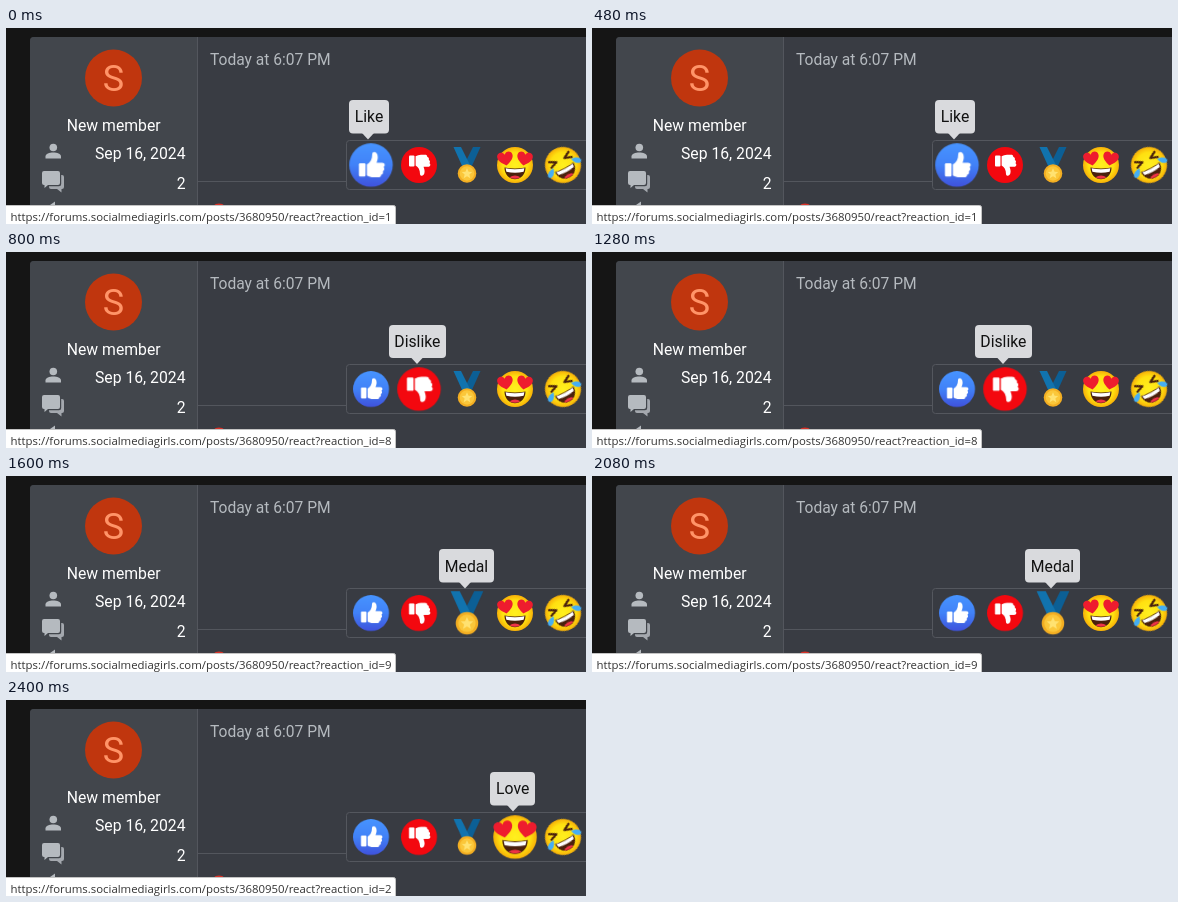
Recreate the animation shown at these times as an HTML page. Size 580 by 196 pixels, loop 3.2 s.

```html
<!DOCTYPE html>
<html lang="en">
<head>
<meta charset="utf-8">
<title>Post reactions</title>
<style>
  html, body { margin: 0; width: 100%; height: 100%; overflow: hidden; background: #151515; }
  svg { display: block; width: 580px; height: 196px; font: 15.75px Roboto, sans-serif; }
  .tip, .url { opacity: 0; animation: show 3.2s step-end infinite; }
  .grow { animation: grow 3.2s step-end infinite; }
  .tip, .url, .grow { animation-delay: calc((var(--i) - 4) * .8s); }
  .tip { text-anchor: middle; }
  .tip rect, .tip path { fill: #d9dadd; }
  .tip text { fill: #111; }
  .status { font: 11.4px "Open Sans", sans-serif; fill: #333; }
  @keyframes show { 0% { opacity: 1 } 25%, 100% { opacity: 0 } }
  @keyframes grow { 0% { transform: scale(1.21) } 25%, 100% { transform: scale(1) } }
</style>
</head>
<body>
<svg viewBox="0 0 580 196">
  <defs>
    <linearGradient id="blue" x2="0" y2="1">
      <stop stop-color="#4794ff"/><stop offset=".5" stop-color="#4182f8"/><stop offset="1" stop-color="#3f52dc"/>
    </linearGradient>
    <radialGradient id="yellow">
      <stop stop-color="#fff01f"/><stop offset=".7" stop-color="#ffe010"/><stop offset="1" stop-color="#f7b008"/>
    </radialGradient>
    <g id="thumb" fill="#fff">
      <rect x="-10" y="-1.5" width="5.5" height="11" rx="1"/>
      <path d="M-3.4-.5C-.5-2 1-5 1-9C1-11.8 5.6-11.5 5.6-6.5C5.6-4.4 4.8-3 4.6-1.8H9.2C11.7-1.8 11.9 1 10.4 1.7C11.5 3 11 4.8 9.8 5.1C10.4 6.6 9.5 7.9 8.3 8.1C8.4 9.6 7.4 10.2 5.8 10.2H2C0 10.2-1.7 9.4-3.4 8.7Z"/>
    </g>
    <path id="heart" fill="#ee1c2e" d="M0 7C-4.3 4.3-7.8 1.2-7.8-2.3C-7.8-7-1.7-8 0-3.8C1.7-8 7.8-7 7.8-2.3C7.8 1.2 4.3 4.3 0 7Z"/>
    <g id="grin">
      <path fill="#4a210c" d="M-10.5 2.5Q0 4.5 10.5 2.5C10.5 18-10.5 18-10.5 2.5Z"/>
      <path fill="#fff" d="M-9.4 3.3Q0 5.2 9.4 3.3L8.6 6.8Q0 8.6-8.6 6.8Z"/>
      <path fill="#ee3346" d="M-5.5 12.2Q0 9 5.5 12.2Q0 15.2-5.5 12.2Z"/>
    </g>
  </defs>

  <!-- post panel -->
  <path fill="#393c43" d="M24 196V13Q24 9 28 9H580V196Z"/>
  <path fill="#42464c" d="M24 196V13Q24 9 28 9H191V196Z"/>
  <path fill="none" stroke="#53565d" d="M191.5 9V196M192 153.5H340"/>

  <!-- author -->
  <circle cx="107.5" cy="50" r="28.5" fill="#c0360e"/>
  <text x="107.5" y="62.5" font-size="36" fill="#ff9468" text-anchor="middle">S</text>
  <g fill="#fff">
    <text x="107.7" y="103" text-anchor="middle">New member</text>
    <g text-anchor="end">
      <text x="179.5" y="131">Sep 16, 2024</text>
      <text x="179.5" y="161">2</text>
    </g>
  </g>
  <g fill="#b5babf">
    <circle cx="47.3" cy="119.5" r="3.8"/>
    <path d="M39.5 130.5V128.5C39.5 123.3 55 123.3 55 128.5V130.5Z"/>
    <path d="M38 143H52Q54 143 54 145V155Q54 157 52 157H42L38.5 160V157H38Q36 157 36 155V145Q36 143 38 143Z"/>
    <path opacity=".85" d="M55.2 147H56Q58 147 58 149V159Q58 161 56 161H55.5V164.5L51 161H45Q43 161 43 159V158.2H53Q55.2 158.2 55.2 156Z"/>
    <path d="M44 177L49 173.5V177Z"/>
    <text x="204" y="37" font-size="15.6">Today at 6:07 PM</text>
  </g>
  <circle cx="213" cy="184" r="8.5" fill="#d93228"/>

  <!-- reaction bar -->
  <rect x="340.5" y="112.5" width="250" height="49" rx="3" fill="#383b42" stroke="#54575e"/>
  <g transform="translate(365 137)"><g class="grow" style="--i:0">
    <circle r="18" fill="url(#blue)"/>
    <use href="#thumb"/>
  </g></g>
  <g transform="translate(413 137)"><g class="grow" style="--i:1">
    <circle r="18" fill="#f3080f"/>
    <use href="#thumb" transform="scale(1 -1)"/>
  </g></g>
  <g transform="translate(461 137)"><g class="grow" style="--i:2">
    <path fill="#0c5f95" d="M13.5-18H6L-4.5 3H4Z"/>
    <path fill="#1173ae" d="M-13.5-18H-6L4.5 3H-4Z"/>
    <circle cy="8.5" r="9.3" fill="#f3ae22"/>
    <circle cy="8.5" r="7.2" fill="#fbc73a"/>
    <path fill="#ffe271" d="M0 3.3L1.6 6.8L5.2 7.1L2.4 9.5L3.3 13.2L0 11.2L-3.3 13.2L-2.4 9.5L-5.2 7.1L-1.6 6.8Z"/>
  </g></g>
  <g transform="translate(509 137)"><g class="grow" style="--i:3">
    <circle r="18" fill="url(#yellow)"/>
    <use href="#heart" transform="translate(-9.7 -6.5) rotate(-10)"/>
    <use href="#heart" transform="translate(9.7 -6.5) rotate(10)"/>
    <use href="#grin"/>
  </g></g>
  <g transform="translate(557 137) rotate(-28)">
    <circle r="18" fill="url(#yellow)"/>
    <path fill="none" stroke="#4a210c" stroke-width="2.2" stroke-linecap="round" stroke-linejoin="round" d="M-11-9L-4.5-5.5L-11.5-3M11-9L4.5-5.5L11.5-3"/>
    <use href="#grin"/>
    <path fill="#45aef5" d="M-10-1.5C-11.5 6-17.5 7.5-18.5 4C-19 .5-14-1.5-10-1.5ZM10-1.5C11.5 6 17.5 7.5 18.5 4C19 .5 14-1.5 10-1.5Z"/>
  </g>

  <!-- tooltips -->
  <g class="tip" style="--i:0">
    <rect x="343" y="72" width="40" height="33.5" rx="4"/><path d="M356 105H368L362 111.5Z"/>
    <text x="363" y="94">Like</text>
  </g>
  <g class="tip" style="--i:1">
    <rect x="383" y="73" width="57" height="33" rx="4"/><path d="M405 105.5H417L411 112Z"/>
    <text x="411.4" y="95">Dislike</text>
  </g>
  <g class="tip" style="--i:2">
    <rect x="433" y="73" width="55" height="33.5" rx="4"/><path d="M453 106H465L459 112.5Z"/>
    <text x="460.5" y="96">Medal</text>
  </g>
  <g class="tip" style="--i:3">
    <rect x="484" y="72" width="45" height="33.5" rx="4"/><path d="M501 105H513L507 111.5Z"/>
    <text x="506.7" y="94">Love</text>
  </g>

  <!-- status bar -->
  <path fill="#fff" stroke="#c4c4c4" d="M-1 177.5H387.5Q389.5 177.5 389.5 179.5V197H-1Z"/>
  <g class="status">
    <text class="url" style="--i:0" x="4.5" y="193">https://forums.socialmediagirls.com/posts/3680950/react?reaction_id=1</text>
    <text class="url" style="--i:1" x="4.5" y="193">https://forums.socialmediagirls.com/posts/3680950/react?reaction_id=8</text>
    <text class="url" style="--i:2" x="4.5" y="193">https://forums.socialmediagirls.com/posts/3680950/react?reaction_id=9</text>
    <text class="url" style="--i:3" x="4.5" y="193">https://forums.socialmediagirls.com/posts/3680950/react?reaction_id=2</text>
  </g>
</svg>
</body>
</html>
```
